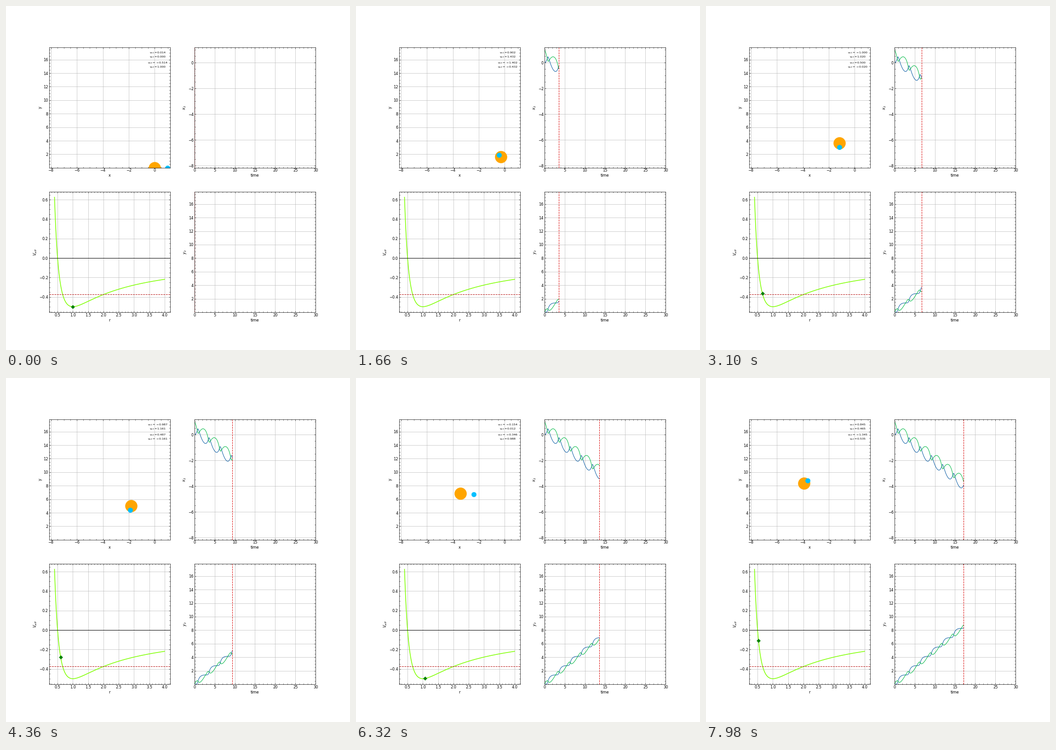
These frames come from a looping animation (748x748 px, 8 s). A matplotlib script:

```python
import numpy as np
import matplotlib.pyplot as plt
from matplotlib.animation import FuncAnimation

SIZE_IN, DPI = 20, 37.4
SLOT = 20                 # ms per drawn slot
SLOTS = 400
SUB = 7                   # orbit samples per step
T0, DT = 0.0142, 0.09998

plt.rcParams.update({
    "font.family": "DejaVu Sans", "font.size": 16,
    "axes.labelsize": 16, "axes.linewidth": 1.4,
    "lines.linewidth": 2, "lines.markersize": 10,
    "axes.grid": True, "grid.color": "#b0b0b0", "grid.linewidth": 1.2,
    "xtick.direction": "in", "ytick.direction": "in",
    "xtick.top": True, "ytick.right": True,
    "xtick.minor.visible": True, "ytick.minor.visible": True,
    "xtick.major.size": 6, "ytick.major.size": 6,
    "xtick.minor.size": 3, "ytick.minor.size": 3,
    "xtick.major.width": 1.2, "ytick.major.width": 1.2,
    "xtick.minor.width": 1.2, "ytick.minor.width": 1.2,
})

# Two equal masses: relative orbit with mu = 2, start (1, 0), velocity (-0.5, 1)
MU, H = 2.0, 1.0
ENERGY = 0.5 * 1.25 - MU
A = -MU / (2 * ENERGY)
ECC = np.sqrt(1 + 2 * ENERGY * H**2 / MU**2)
N = np.sqrt(MU / A**3)
B = A * np.sqrt(1 - ECC**2)
E0 = -np.arccos((1 - 1 / A) / ECC)
M0 = E0 - ECC * np.sin(E0)
TURN = -np.arctan2(B * np.sin(E0), A * (np.cos(E0) - ECC))


def turn(x, y):
    c, s = np.cos(TURN), np.sin(TURN)
    return np.array([c * x - s * y, s * x + c * y])


def bodies(t):
    """Positions and velocities of both bodies, and their distance."""
    m = M0 + N * t
    e = m + ECC * np.sin(m)
    for _ in range(12):
        e = e - (e - ECC * np.sin(e) - m) / (1 - ECC * np.cos(e))
    r = A * (1 - ECC * np.cos(e))
    rel = turn(A * (np.cos(e) - ECC), B * np.sin(e))
    rate = N * A / r
    vel = turn(-A * np.sin(e) * rate, B * np.cos(e) * rate)
    mid = np.array([0.5 - 0.25 * t, 0.5 * t])
    vmid = np.array([-0.25 + 0 * t, 0.5 + 0 * t])
    return mid - rel / 2, mid + rel / 2, vmid - vel / 2, vmid + vel / 2, r


def v_eff(r):
    return 0.5 / r**2 - 1 / r


steps = 3 * SLOTS // 7 + 2
times = T0 + DT / SUB * np.arange(steps * SUB)
p1, p2, v1, v2, dist = bodies(times)

fig, axes = plt.subplots(2, 2, figsize=(SIZE_IN, SIZE_IN), dpi=DPI)
(plane, xt), (well, yt) = axes

XLIM, YLIM = (-8.147, 1.192), (0.017, 17.83)
plane.set(xlabel="x", ylabel="y", xlim=XLIM, ylim=YLIM)
xt.set(xlabel="time", ylabel="$x_2$", xlim=(0, 30), ylim=XLIM)
yt.set(xlabel="time", ylabel="$y_2$", xlim=(0, 30), ylim=YLIM)

radii = np.linspace(0.4, 4, 400)
well.plot(radii, v_eff(radii), color="chartreuse", lw=3)
well.axhline(0, color="black")
well.axhline(-0.375, color="#b81414", ls="--")
well.set(xlabel="r", ylabel="$V_{eff}$",
         xlim=(0.22, 4.18), ylim=(-0.55625, 0.68125))

# Bake everything that never moves into one background image
spines = [s for ax in axes.flat for s in ax.spines.values()]
for s in spines:
    s.set_visible(False)
fig.canvas.draw()
still = np.array(fig.canvas.buffer_rgba())
for s in spines:
    s.set_visible(True)
for ax in axes.flat:
    ax.patch.set_visible(False)
    ax.xaxis.set_visible(False)
    ax.yaxis.set_visible(False)
for line in well.lines:
    line.set_visible(False)
fig.figimage(still, zorder=-1)

big, = plane.plot([], [], "o", color="orange", ms=50)
small, = plane.plot([], [], "o", color="deepskyblue", ms=20)
label = plane.text(0.981, 0.972, "", transform=plane.transAxes, fontsize=12,
                   ha="right", va="top", multialignment="center")
gem, = well.plot([], [], "D", color="green")
trails, cursors = [], []
for ax in (xt, yt):
    trails.append([ax.plot([], [], color=c)[0] for c in ("#0C5DA5", "#00B945")])
    cursors.append(ax.axvline(0, color="#dc1010", ls="--"))


def step_at(slot):
    """Steps last 20, 100 and 20 ms in turn."""
    cycle, part = divmod(slot, 7)
    return 3 * cycle + (part > 0) + (part > 5)


def update(slot):
    k = step_at(slot) * SUB
    big.set_data(p1[:1, k], p1[1:, k])
    small.set_data(p2[:1, k], p2[1:, k])
    gem.set_data([dist[k]], [v_eff(dist[k])])
    label.set_text("\n".join(
        f"$v_{{{axis}{n}}}={v[j, k]:.3f}$"
        for n, v in ((1, v1), (2, v2)) for j, axis in enumerate("xy")))
    for j in range(2):
        for line, p in zip(trails[j], (p1, p2)):
            line.set_data(times[:k + 1], p[j, :k + 1])
        cursors[j].set_xdata([times[k]] * 2)
    return []


anim = FuncAnimation(fig, update, frames=SLOTS, interval=SLOT,
                     repeat=True, repeat_delay=0, blit=False)
plt.show()
```
